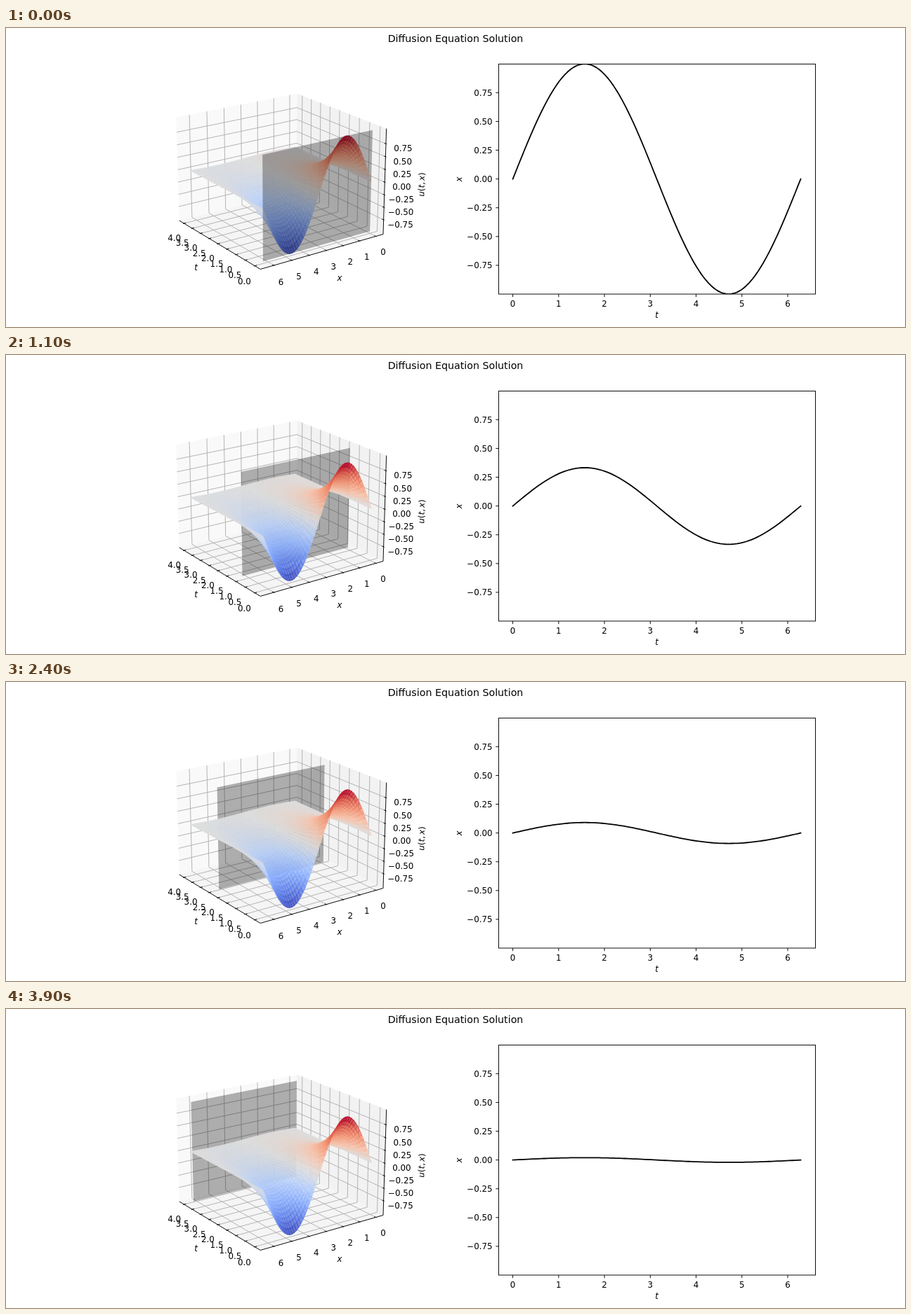
Animation of 1280 by 427 pixels, one loop 4000 ms. Source, as an HTML page with a canvas:

```html
<!DOCTYPE html>
<html lang="en">
<head>
<meta charset="utf-8">
<title>Diffusion Equation Solution</title>
<style>
  html, body { margin: 0; width: 100%; height: 100%; overflow: hidden; background: #fff; }
  #stage { position: relative; width: 1280px; height: 427px; overflow: hidden; }
  #stage > * { position: absolute; left: 0; top: 0; }
  #surface { z-index: 2; }
  #front { z-index: 3; }
  text { font: 11.85px "DejaVu Sans", sans-serif; text-anchor: middle; }
  .end { text-anchor: end; }
  .title { font-size: 14.22px; }
  .it { font-style: italic; }
  .axis { fill: none; stroke: #000; stroke-width: .95; }
  .grid { fill: none; stroke: #b0b0b0; stroke-width: .95; }
  #curve { fill: none; stroke: #000; stroke-width: 1.78; stroke-linejoin: round; stroke-linecap: square; }
</style>
</head>
<body>
<div id="stage">
  <svg id="back" width="1280" height="427">
    <clipPath id="clip"><rect x="701.5" y="51.3" width="450.5" height="328.8"/></clipPath>
    <g id="box"></g>
    <g id="chart">
      <path id="curve" clip-path="url(#clip)"/>
      <rect class="axis" x="701.5" y="51.5" width="451" height="328.5"/>
    </g>
    <text class="title" x="640" y="20.3">Diffusion Equation Solution</text>
  </svg>
  <canvas id="surface" width="1280" height="427"></canvas>
  <svg id="front" width="1280" height="427"><polygon id="plane" fill="#000" fill-opacity=".305"/></svg>
</div>
<script>
const $ = id => document.getElementById(id);
const TAU = 2 * Math.PI, RAD = Math.PI / 180;
const H = 0.5953, HZ = 0.4464;               // half sizes of the 3D box
const ST = 0.25975, SX = 0.16537, SU = 0.4286; // data units to box units
const CE = Math.cos(20 * RAD), SE = Math.sin(20 * RAD);
const CA = Math.cos(145 * RAD), SA = Math.sin(145 * RAD);

// Perspective view of a point in box space: [x, y, depth]
function view(x, y, z) {
  const fwd = x * CA + y * SA;
  const d = 10 - fwd * CE - z * SE;
  return [389.9 + 1777 * (y * CA - x * SA) / d, 211.2 - 1777 * (z * CE - fwd * SE) / d, d];
}
const bt = t => (t - 2) * ST, bx = x => (x - Math.PI) * SX, bu = u => u * SU;
const data = (t, x, u) => view(bt(t), bx(x), bu(u));
const points = list => list.map(p => p[0].toFixed(2) + ',' + p[1].toFixed(2)).join(' ');
const span = (a, b, step) => Array.from({ length: Math.round((b - a) / step) + 1 }, (_, i) => a + i * step);
const num = (v, n) => v.toFixed(n).replace('-', '\u2212');

function add(parent, tag, attrs, content) {
  const el = document.createElementNS('http://www.w3.org/2000/svg', tag);
  for (const k in attrs) el.setAttribute(k, attrs[k]);
  if (content) el.innerHTML = content;
  return parent.appendChild(el);
}

function drawBox() {
  const box = $('box');
  const line = (cls, ...ps) => add(box, 'polyline', { class: cls, points: points(ps.map(p => view(...p))) });
  const pane = (fill, ...ps) => add(box, 'polygon', { fill, points: points(ps.map(p => view(...p))) });
  const tickText = (p, s) => {
    const [x, y] = view(...p);
    add(box, 'text', { x, y: y + 9.4 }, s);
  };
  const label = (p, s, turn = 0) => {
    const [x, y] = view(...p);
    add(box, 'text', { transform: `translate(${x} ${y}) rotate(${turn})`, y: 3.7 }, s);
  };

  pane('#f9f9f9', [H, -H, -HZ], [H, H, -HZ], [H, H, HZ], [H, -H, HZ]);
  pane('#f2f2f2', [-H, -H, -HZ], [H, -H, -HZ], [H, -H, HZ], [-H, -H, HZ]);
  pane('#f5f5f5', [-H, -H, -HZ], [H, -H, -HZ], [H, H, -HZ], [-H, H, -HZ]);

  const ts = span(0, 4, .5), xs = span(0, 6, 1), us = span(-.75, .75, .25);
  ts.map(bt).forEach(t => line('grid', [t, H, -HZ], [t, -H, -HZ], [t, -H, HZ]));
  xs.map(bx).forEach(x => line('grid', [-H, x, -HZ], [H, x, -HZ], [H, x, HZ]));
  us.map(bu).forEach(u => line('grid', [-H, -H, u], [H, -H, u], [H, H, u]));

  line('axis', [-H, H, -HZ], [H, H, -HZ]);
  line('axis', [-H, H, -HZ], [-H, -H, -HZ]);
  line('axis', [-H, -H, -HZ], [-H, -H, HZ]);

  const out = H + .0095, inn = H - .019, far = H + .0948, low = -HZ - .0711;
  ts.forEach(v => {
    const t = bt(v);
    line('axis', [t, out, -HZ], [t, inn, -HZ]);
    tickText([t, far, low], num(v, 1));
  });
  xs.forEach(v => {
    const x = bx(v);
    line('axis', [-out, x, -HZ], [-inn, x, -HZ]);
    tickText([-far, x, low], num(v, 0));
  });
  us.forEach(v => {
    const u = bu(v);
    line('axis', [-out, -H, u], [-inn, -H, u]);
    tickText([-far, -far, u], num(v, 2));
  });

  const it = s => `<tspan class="it">${s}</tspan>`;
  label([0, .8012, -.6008], it('t'));
  label([-.8012, 0, -.6008], it('x'));
  label([-.8012, -.8012, 0], it('u') + '(' + it('t') + ',<tspan class="it" dx="2.2">x</tspan>)', -88.5);
}

const px = x => 721.6 + x * 409.9 / TAU, py = y => 215.63 - 164.4 * y;

function drawChart() {
  const g = $('chart');
  span(0, 6, 1).forEach(v => {
    add(g, 'path', { class: 'axis', d: `M${px(v)} 380v4.2` });
    add(g, 'text', { x: px(v), y: 397.8 }, num(v, 0));
  });
  span(-.75, .75, .25).forEach(v => {
    add(g, 'path', { class: 'axis', d: `M701.5 ${py(v)}h-4.2` });
    add(g, 'text', { class: 'end', x: 692.6, y: py(v) + 4.4 }, num(v, 2));
  });
  add(g, 'text', { class: 'it', x: 926.5, y: 414 }, 't');
  add(g, 'text', { class: 'it', transform: 'translate(649 216) rotate(-90)' }, 'x');
}

const COOLWARM = [[59, 76, 192], [98, 130, 234], [141, 176, 254], [184, 208, 249], [221, 221, 221],
  [245, 196, 173], [244, 154, 123], [222, 96, 77], [180, 4, 38]];

function color(u) {
  const s = Math.min(Math.max((u + 1) * 4, 0), 7.999), i = Math.floor(s);
  return `rgb(${COOLWARM[i].map((c, k) => Math.round(c + (COOLWARM[i + 1][k] - c) * (s - i)))})`;
}

function drawSurface() {
  const NT = 40, NX = 50, quads = [];
  const heat = (t, x) => Math.exp(-t) * Math.sin(x);
  for (let i = 0; i < NT; i++) for (let j = 0; j < NX; j++) {
    const corners = [[i, j], [i + 1, j], [i + 1, j + 1], [i, j + 1]].map(([a, b]) => {
      const t = 4 * a / NT, x = TAU * b / NX;
      return { u: heat(t, x), p: data(t, x, heat(t, x)) };
    });
    const mean = f => corners.reduce((s, c) => s + f(c), 0) / 4;
    quads.push({ ps: corners.map(c => c.p), depth: mean(c => c.p[2]), fill: color(mean(c => c.u) / .975) });
  }
  quads.sort((a, b) => b.depth - a.depth);
  const c = $('surface').getContext('2d');
  c.globalAlpha = .8;
  c.lineWidth = 1.18;
  c.lineJoin = 'round';
  for (const q of quads) {
    c.beginPath();
    q.ps.forEach(p => c.lineTo(p[0], p[1]));
    c.closePath();
    c.fillStyle = c.strokeStyle = q.fill;
    c.fill();
    c.stroke();
  }
}

function show(step) {
  const t = step / 10, amp = Math.exp(-t);
  $('plane').setAttribute('points', points([data(t, 0, -1), data(t, TAU, -1), data(t, TAU, 1), data(t, 0, 1)]));
  // The cutting plane is in front of the surface only while it is near
  $('front').style.zIndex = t < .73 ? 3 : 1;
  $('curve').setAttribute('d', 'M' + points(span(0, 100, 1).map(i => {
    const x = TAU * i / 100;
    return [px(x), py(amp * Math.sin(x))];
  })));
}

drawBox();
drawChart();
drawSurface();
let last = -1;
function tick() {
  const step = Math.floor(performance.now() / 100) % 40;
  if (step !== last) show(last = step);
  requestAnimationFrame(tick);
}
tick();
</script>
</body>
</html>
```
